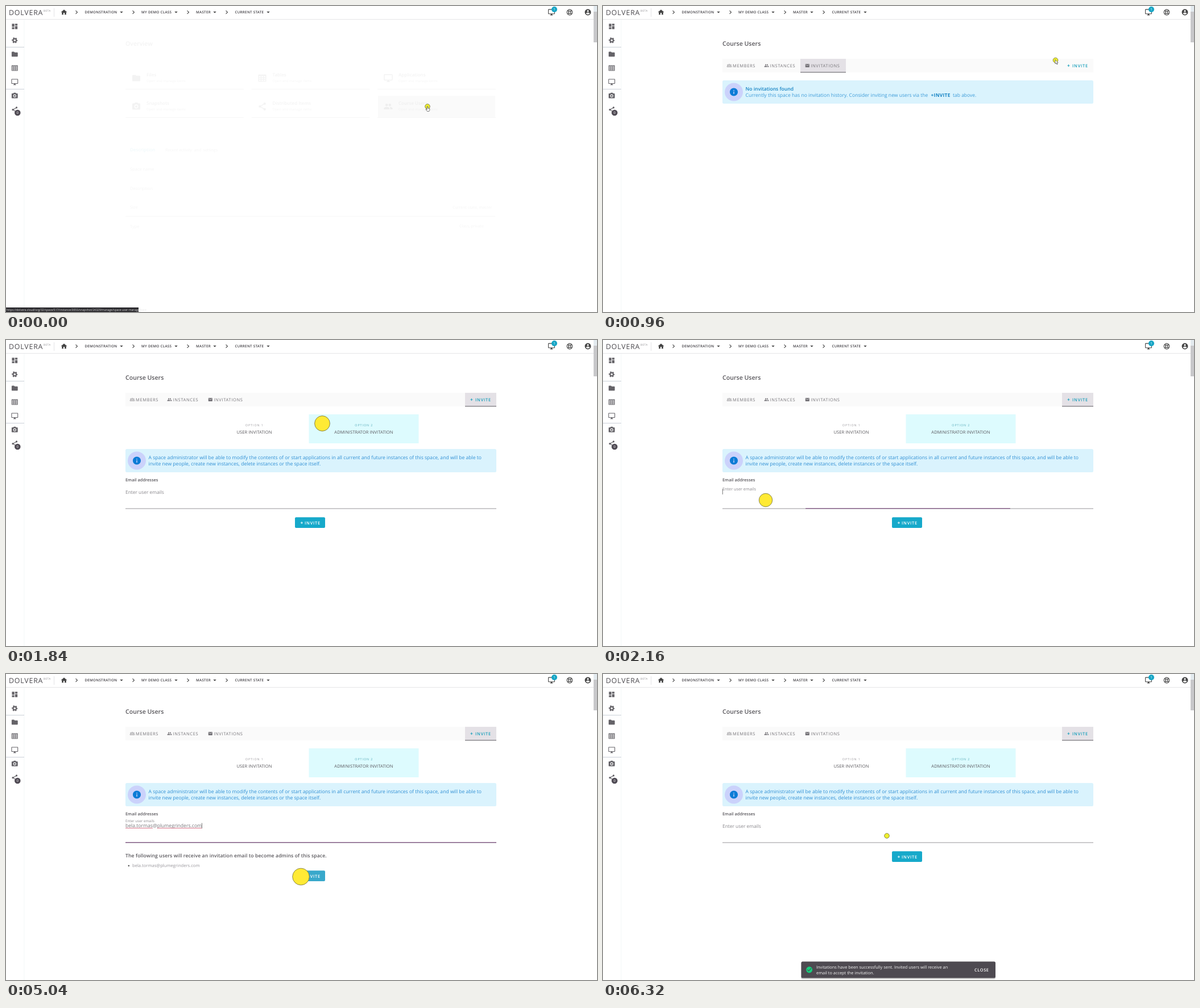
Animation of 1039x539 px, one loop 7.36 s. Source, as an HTML page:

```html
<!DOCTYPE html>
<html lang="en">
<head>
<meta charset="utf-8">
<title>Inviting an administrator</title>
<style>
html, body { margin: 0; width: 100%; height: 100%; overflow: hidden; background: #fff; }
svg { display: block; width: 100%; height: 100%; }
text { font-family: "Open Sans", "Noto Sans", sans-serif; white-space: pre; text-rendering: geometricPrecision; }
</style>
</head>
<body>
<svg id="stage" viewBox="0 0 1039 539"></svg>
<script>
const LOOP = 7360, STEP = 80;
const TEAL = '#179fbb', DARK = '#58565b', MID = '#77757a', PALE = '#99979c', BLUE = '#3d9bd8';
const MAIL = 'bela.tormas@plumegrinders.com', AT = MAIL.indexOf('@');

// Markup helpers
const rect = (x, y, w, h, fill, more = '') =>
  `<rect x="${x}" y="${y}" width="${w}" height="${h}" fill="${fill}" ${more}/>`;
const circle = (x, y, r, fill, more = '') =>
  `<circle cx="${x}" cy="${y}" r="${r}" fill="${fill}" ${more}/>`;
const text = (x, y, size, fill, str, { w = 400, ls = 0, mid = false, id = '' } = {}) =>
  `<text x="${x}" y="${y}" font-size="${size}" fill="${fill}" font-weight="${w}" letter-spacing="${ls}"` +
  `${mid ? ' text-anchor="middle"' : ''}${id && ` id="${id}"`}>${str}</text>`;
const group = (id, inner) => `<g id="${id}">${inner}</g>`;
// Icons live in a 24 unit box centred on x, y
const icon = (name, x, y, fill, scale = .54) =>
  `<g transform="translate(${x} ${y}) scale(${scale}) translate(-12 -12)" fill="${fill}">${ICONS[name](fill)}</g>`;
const path = d => () => `<path d="${d}"/>`;

const DISC = 'M12 2C6.48 2 2 6.48 2 12s4.48 10 10 10 10-4.48 10-10S17.52 2 12 2z';
const ICONS = {
  home: path('M10 20v-6h4v6h5v-8h3L12 3 2 12h3v8z'),
  next: path('M10 6L8.6 7.4 13.2 12l-4.6 4.6L10 18l6-6z'),
  drop: path('M7 10l5 5 5-5z'),
  screen: path('M21 2H3c-1.1 0-2 .9-2 2v12c0 1.1.9 2 2 2h7v2H8v2h8v-2h-2v-2h7c1.1 0 2-.9 2-2V4c0-1.1-.9-2-2-2zm0 14H3V4h18z'),
  user: path(DISC + 'm0 3c1.66 0 3 1.34 3 3s-1.34 3-3 3-3-1.34-3-3 1.34-3 3-3zm0 14.2c-2.5 0-4.7-1.3-6-3.2 0-2 4-3.1 6-3.1s6 1.1 6 3.1c-1.3 1.9-3.5 3.2-6 3.2z'),
  board: path('M3 13h8V3H3zm0 8h8v-6H3zm10 0h8V11h-8zm0-18v6h8V3z'),
  folder: path('M10 4H4c-1.1 0-2 .9-2 2v12c0 1.1.9 2 2 2h16c1.1 0 2-.9 2-2V8c0-1.1-.9-2-2-2h-8z'),
  camera: path('M9 2L7.2 4H4c-1.1 0-2 .9-2 2v12c0 1.1.9 2 2 2h16c1.1 0 2-.9 2-2V6c0-1.1-.9-2-2-2h-3.2L15 2zm3 15c-2.76 0-5-2.24-5-5s2.24-5 5-5 5 2.24 5 5-2.24 5-5 5zm0-2a3 3 0 1 0 0-6 3 3 0 0 0 0 6z'),
  mail: path('M20 4H4c-1.1 0-2 .9-2 2v12c0 1.1.9 2 2 2h16c1.1 0 2-.9 2-2V6c0-1.1-.9-2-2-2zm0 4l-8 5-8-5V6l8 5 8-5z'),
  copy: path('M16 1H4c-1.1 0-2 .9-2 2v14h2V3h12zm3 4H8c-1.1 0-2 .9-2 2v14c0 1.1.9 2 2 2h11c1.1 0 2-.9 2-2V7c0-1.1-.9-2-2-2zm0 16H8V7h11z'),
  info: path(DISC + 'm1 15h-2v-6h2zm0-8h-2V7h2z'),
  check: path(DISC + 'm-2 15l-5-5 1.4-1.4 3.6 3.6 7.6-7.6L19 8z'),
  table: c => rect(3, 4, 18, 16, 'none', `stroke="${c}" stroke-width="2"`) +
    `<path d="M3 6h18M3 11h18M3 15.500h18M9 6v14M15 6v14" stroke="${c}" stroke-width="1.800"/>`,
  gear: c => circle(12, 12, 5.2, 'none', `stroke="${c}" stroke-width="4"`) +
    circle(12, 12, 8.2, 'none', `stroke="${c}" stroke-width="2.800" stroke-dasharray="4.300" stroke-dashoffset="2.200"`),
  ring: c => circle(12, 12, 9, 'none', `stroke="${c}" stroke-width="2"`) +
    circle(12, 12, 4, 'none', `stroke="${c}" stroke-width="2"`) +
    `<path d="M5.500 5.500l4 4m5 5l4 4m0-13l-4 4m-5 5l-4 4" stroke="${c}" stroke-width="2.500"/>`,
  share: c => circle(18, 5, 3, c) + circle(6, 12, 3, c) + circle(18, 19, 3, c) +
    `<path d="M18 5L6 12l12 7" fill="none" stroke="${c}" stroke-width="2"/>`,
  people: c => circle(8, 8, 3.2, c) + circle(16, 8, 3.2, c) +
    '<path d="M1 19v-2.500c0-2.300 4.700-3.500 7-3.500s7 1.200 7 3.500V19zM17 19v-2.500c0-1.500-.8-2.600-2-3.500 2.500-.3 8 1 8 3.500V19z"/>',
  crowd: c => [5, 12, 19].map(x => circle(x, x === 12 ? 7 : 9, 2.4, 'none', `stroke="${c}" stroke-width="1.600"`)).join('') +
    `<path d="M1 18v-2c0-3 7-3 7-1 1-3 7-3 8 0 0-2 7-2 7 1v2z" fill="none" stroke="${c}" stroke-width="1.800"/>`
};

const crumb = (label, x, chevron, arrow) =>
  icon('next', chevron, 11, '#444') + text(x, 13.2, 6.2, '#3f3d42', label, { w: 600, ls: .3 }) + icon('drop', arrow, 10.8, '#444');

const chrome = () =>
  rect(0, 23, 1033, .8, '#dfdfe3') + rect(31.5, 24, .8, 515, '#f0f3f6') +
  text(5, 15.5, 12.4, '#4c4a4f', 'DOLVERA', { w: 500, ls: .8 }) + text(66, 10, 4.6, '#8a888d', 'BETA', { ls: .5 }) +
  rect(84, 4, .8, 15, '#dddde0') + icon('home', 102, 11, '#444') +
  crumb('DEMONSTRATION', 138.5, 124, 203) + crumb('MY DEMO CLASS', 238, 224, 299) +
  crumb('MASTER', 334, 320, 367) + crumb('CURRENT STATE', 402.5, 388, 461) +
  icon('screen', 959, 11, '#444') + circle(964, 6, 5, '#16a5c5') + text(964, 8.2, 6, '#fff', '1', { mid: true }) +
  icon('ring', 991, 11, '#444') + icon('user', 1023, 11, '#444') +
  rect(1033, 0, 6, 64, '#c8c8ca') + rect(1033, 0, 6, 10, '#e3ebef') +
  ['board', 'gear', 'folder', 'table', 'screen', 'camera', 'share']
    .map((name, i) => icon(name, 15.3, 36 + i * 24.45, '#656368')).join('') +
  rect(0, 72, 32, .9, '#c6cbd4') + rect(0, 146, 32, .9, '#c6cbd4') +
  circle(20.3, 188, 5.3, '#504b54') + text(20.3, 190.2, 6, '#fff', '0', { mid: true });

const overview = () => {
  const cards = [['Files', 'folder'], ['Tables', 'table'], ['Applications', 'screen'],
    ['Snapshots', 'camera'], ['Distributed Items', 'share'], ['Course Users', 'people']];
  return rect(654, 158, 206, 38, '#fafafa') + '<g opacity=".06">' + text(210, 70, 10.6, '#444', 'Overview', { w: 600 }) +
    cards.map(([name, pic], i) => {
      const x = 210 + i % 3 * 221.5, y = 108 + (i > 2 ? 50 : 0);
      return rect(x, y + 38, 208, .8, '#555') + icon(pic, x + 19, y + 19, '#444', .7) +
        text(x + 37, y + 16, 8, '#444', name, { w: 600 }) + text(x + 37, y + 26, 6, '#666', 'Open and manage items');
    }).join('') +
    text(218, 256, 8, TEAL, 'Description', { w: 600 }) + text(280, 256, 7, '#666', 'Recent activity  and  settings') +
    ['Space name', 'Description', 'Size', 'Type'].map((s, i) => text(218, 290 + i * 33.5, 7.5, '#666', s)).join('') +
    text(785, 357, 7, '#666', 'Current state, master') + text(797, 390, 7, '#666', 'Class, private') +
    rect(210, 370, 650, .8, '#666') + '</g>';
};

const tab = (pic, x, label) => icon(pic, x, 105, MID, .36) + text(x + 6, 107.8, 7.5, MID, label, { ls: .65 });
const invite = (x, y, fill, gap) =>
  text(x, y, 8.5, fill, '+', { w: 700 }) + text(x + gap, y, 7.4, fill, 'INVITE', { w: 600, ls: .8 });
const header = () => text(210, 70, 10.6, DARK, 'Course Users', { w: 600 }) +
  rect(210, 93, 652, 24, '#fafafa') +
  group('tabMark', rect(0, 93, 1, 24, '#e4e1e6') + rect(0, 116.3, 1, 1, '#5c5960')) +
  tab('crowd', 222, 'MEMBERS') + tab('people', 287.5, 'INSTANCES') + tab('mail', 359.3, 'INVITATIONS') +
  invite(816, 107.9, TEAL, 9);

const notice = (y, fill, halo, ink, pic) => rect(210, y, 652, 41, fill, 'rx="2.500"') +
  circle(230, y + 20.5, 16, halo) + icon(pic, 230, y + 20.5, ink, .7);
const blueNotice = y => notice(y, '#daf3fd', '#cbd2fb', '#0c7cd6', 'info');
const empty = () => blueNotice(131) +
  text(250.5, 149, 8.55, '#1583c4', 'No invitations found', { w: 600 }) +
  text(250.5, 160, 8.6, BLUE, 'Currently this space has no invitation history. Consider inviting new users via the') +
  text(576.5, 160, 8.4, '#1583c4', '+INVITE', { w: 700, ls: .3 }) + text(615, 160, 8.5, BLUE, 'tab above.');

const options = () => rect(340, 131, 193, 51, '#ddfbfe', 'id="optBox"') +
  text(436.8, 152.2, 5.4, PALE, 'OPTION 1', { ls: .9, mid: true, id: 'opt1' }) +
  text(436.5, 164.8, 7.55, DARK, 'USER INVITATION', { ls: .1, mid: true }) +
  text(629.3, 152.2, 5.4, PALE, 'OPTION 2', { ls: .9, mid: true, id: 'opt2' }) +
  text(629, 164.8, 7.55, DARK, 'ADMINISTRATOR INVITATION', { ls: .1, mid: true });

const radio = (x, c) => circle(x, 225, 4.9, 'none', `stroke="${c}" stroke-width="1.200"`);
const linkForm = () => radio(383, TEAL) + circle(383, 225, 2.7, TEAL) + radio(526.5, MID) +
  text(393, 228, 8.6, '#8a888d', 'Invite to individual instances', { ls: .2 }) +
  text(536.7, 228, 8.6, '#8a888d', 'Invite to an existing shared instance', { ls: .16 }) +
  text(543.5, 238, 6.5, TEAL, '(you can create a shared instance here)', { w: 600, ls: .13 }) +
  notice(255.5, '#d9fdf1', '#c5f3d6', '#12cb78', 'check') +
  text(250.5, 273, 8.55, '#14bb74', 'Instance Creation with Latest Shared Content', { w: 600 }) +
  text(250.5, 284, 8.6, '#35c68a', 'The instance(s) you will create will contain the most recent contents that you have shared so far (if any).') +
  text(218, 319, 7.5, TEAL, 'INVITE VIA LINK', { ls: .83 }) + text(300.5, 319, 7.5, MID, 'INVITE VIA EMAIL', { ls: .83 }) +
  rect(210, 328, 652, .9, '#bdbbc0') + rect(210, 327.2, 82, 1.5, TEAL) +
  text(210, 357.5, 8.6, DARK, 'Share the following link (e.g. via a Learning Management System)', { w: 600, ls: .1 }) +
  text(210, 372.3, 7.55, PALE, 'Participants will be able to sign up using the below link and receive their own separate instance for work') +
  text(210, 398, 8.6, MID, 'https://dolvera.cloud/enroll/class/3d0a062b61e1482be0e9892e227c7bf58db596672fe7bbd20dbeca1acbbb95d3', { ls: .03 }) +
  rect(210, 403.2, 633, .9, '#aaa8ad') + icon('copy', 852.5, 397, TEAL, .5);

const adminForm = () => blueNotice(192) +
  text(250.5, 210, 8.58, '#2f8fd4', 'A space administrator will be able to modify the contents of or start applications in all current and future instances of this space, and will be able to') +
  text(250.5, 221, 8.6, '#2f8fd4', 'invite new people, create new instances, delete instances or the space itself.') +
  text(210, 249.2, 7.4, DARK, 'Email addresses', { w: 600 }) +
  text(210, 271, 8.4, '#8a888d', 'Enter user emails', { id: 'label' }) +
  text(210, 270.3, 8.6, MID, '', { id: 'typed' }) +
  rect(0, 262.5, .8, 9.5, '#555', 'id="caret"') +
  group('spelling', rect(210, 271.2, 0, .8, '#d0566f', 'id="nameLine"') + rect(210, 271.2, 0, .8, '#d0566f', 'id="hostLine"')) +
  rect(210, 296.6, 652, .8, '#7d7b80') + rect(210, 296, 0, 1.4, '#8a628c', 'id="focus"') +
  group('list', text(210, 323, 8.6, DARK, 'The following users will receive an invitation email to become admins of this space.', { w: 600, ls: .12 }) +
    circle(215.8, 337.8, 1.3, '#555') + text(222, 339.8, 7.6, PALE, '', { id: 'item' })) +
  group('button', rect(508, 312.3, 53, 18.6, '#16a9ca', 'rx="2" id="face"') + invite(517.5, 324.6, '#fff', 7.5));

const snackbar = () => rect(348, 507.5, 342, 30, '#000', 'rx="2.500" opacity=".18"') +
  rect(348.5, 506.5, 341.5, 29, '#4e4a51', 'rx="2.500"') + icon('check', 362.7, 521, '#14cf7c') +
  text(375, 518.5, 7.4, '#f4f4f4', 'Invitations have been successfully sent. Invited users will receive an') +
  text(375, 528.7, 7.4, '#f4f4f4', 'email to accept the invitation.') +
  text(653, 524, 7.4, '#fff', 'CLOSE', { w: 600, ls: .6 });

const status = () => rect(0, 531, 233, 8, '#2d2c30') +
  text(1, 537.2, 5, '#e6e6e6', 'https://dolvera.cloud/org/32/space/517/instance/3055/snapshot/24329/manage/space-user-management');

const pointer = () => '<circle id="dot" stroke="#6f6d3c" stroke-width=".8"/>' +
  '<g fill="#fff" stroke="#444" stroke-width=".7">' +
  '<path id="arrow" d="M-.5-1v7.500l1.800-1.600 1.200 2.600 1.100-.5-1.200-2.500h2.300z"/>' +
  '<path id="hand" d="M-.8 0q.8-1.200 1.600 0v3l3 .8v2.700l-1 2h-3.300l-2.600-3.500q.5-1 2.300.5z"/></g>';

const stage = document.getElementById('stage');
stage.innerHTML = rect(0, 0, 1039, 539, '#fff') + chrome() + group('overview', overview()) + group('status', status()) +
  group('page', header() + group('empty', empty()) + group('options', options()) +
    group('linkForm', linkForm()) + group('adminForm', adminForm())) +
  group('snackbar', snackbar()) + group('cursor', pointer());
const el = {};
stage.querySelectorAll('[id]').forEach(n => el[n.id] = n);

// Timing helpers
const ramp = (t, from, span) => Math.min(1, Math.max(0, (t - from) / span));
const smooth = u => u * u * (3 - 2 * u);
const within = (t, a, b) => t >= a && t < b;
const set = (id, attrs) => { for (const k in attrs) el[id].setAttribute(k, attrs[k]); };
const fade = (id, v) => set(id, { opacity: Number(v) });

const ROUTE = [[0, 741, 177], [240, 741, 177], [960, 795.5, 95.5], [1120, 832, 104], [1280, 832, 104],
  [1600, 555.5, 145], [1840, 556, 147], [2080, 286, 282], [4800, 286, 282], [5000, 518.5, 357], [5600, 518.5, 357], [6320, 499, 285]];
const CLICKS = [1100, 1680, 2100, 4920], CLICK_SPAN = 240;
// Typing bursts: start, duration, characters
const BURSTS = [[2480, 640, 11], [3280, 80, 1], [3440, 240, 5], [3760, 720, 12]];
const OPEN = 1120, ADMIN = 1760, FOCUS = 2080, BLUR = 5040, SENT = 5520;

function place(t) {
  let i = ROUTE.findIndex(p => p[0] > t);
  if (i < 0) i = ROUTE.length;
  const a = ROUTE[i - 1], b = ROUTE[i] || a;
  const u = smooth(ramp(t, a[0], b[0] - a[0] || 1));
  return [a[1] + (b[1] - a[1]) * u, a[2] + (b[2] - a[2]) * u];
}

function renderField(t) {
  const lift = ramp(t, FOCUS, 150) - ramp(t, SENT, 160);
  set('label', { y: 271 - 10.5 * lift, 'font-size': 8.4 - 2.1 * lift });
  const half = 326 * (ramp(t, FOCUS, 145) - ramp(t, BLUR, 160));
  set('focus', { x: 536 - half, width: 2 * half });

  const count = t < SENT ? BURSTS.reduce((n, [a, d, k]) => n + Math.round(k * ramp(t, a, d)), 0) : 0;
  el.typed.textContent = el.item.textContent = MAIL.slice(0, count);
  const widthTo = n => n && count >= n ? el.typed.getSubStringLength(0, n) : 0;
  const end = widthTo(count), host = widthTo(AT + 1);
  set('caret', { x: 209.8 + end });
  fade('caret', within(t, FOCUS, BLUR + STEP) && !within(t, 4720, 4960));
  set('nameLine', { width: widthTo(AT) });
  set('hostLine', { x: 210 + host, width: end - host });
  fade('spelling', within(t, BLUR, SENT));

  fade('list', count > 0);
  set('button', { transform: `translate(0 ${count ? 34 : 0})` });
  set('face', { fill: within(t, 4960, SENT) ? '#38a8cb' : '#16a9ca' });
}

function renderCursor(t) {
  const [x, y] = place(t);
  const pulse = CLICKS.reduce((m, c) => Math.max(m, Math.sin(Math.PI * ramp(t, c, CLICK_SPAN))), 0);
  set('cursor', { transform: `translate(${x} ${y})` });
  set('dot', { r: 4.3 + 10.5 * pulse, fill: pulse > .1 ? '#ffea35' : '#eff02e' });
  const hand = t < 240 || within(t, 1040, 1360) || within(t, 1520, 1920) || within(t, 5120, SENT);
  const arrow = !hand && (t < 2000 || within(t, SENT, 5760));
  fade('hand', hand && pulse < .5);
  fade('arrow', arrow && pulse < .5);
}

function render(t) {
  fade('overview', 1 - ramp(t, 0, 160));
  fade('status', t < 160);
  fade('page', ramp(t, 80, 240));
  fade('empty', t < OPEN);
  set('tabMark', { transform: t < OPEN ? 'translate(347 0) scale(80 1)' : 'translate(807 0) scale(55 1)' });

  const opened = ramp(t, OPEN, 160), second = t >= ADMIN;
  fade('options', opened);
  fade('linkForm', second ? 0 : opened);
  fade('adminForm', ramp(t, ADMIN - STEP, 160) * second);
  set('optBox', { x: second ? 532.5 : 340 });
  set('opt1', { fill: second ? PALE : '#55a9b8' });
  set('opt2', { fill: second ? '#55a9b8' : PALE });

  renderField(t);
  fade('snackbar', ramp(t, SENT - STEP, 160));
  renderCursor(t);
}

function tick(now) {
  render(Math.floor(now % LOOP / STEP) * STEP);
  requestAnimationFrame(tick);
}
render(0);
requestAnimationFrame(tick);
</script>
</body>
</html>
```
